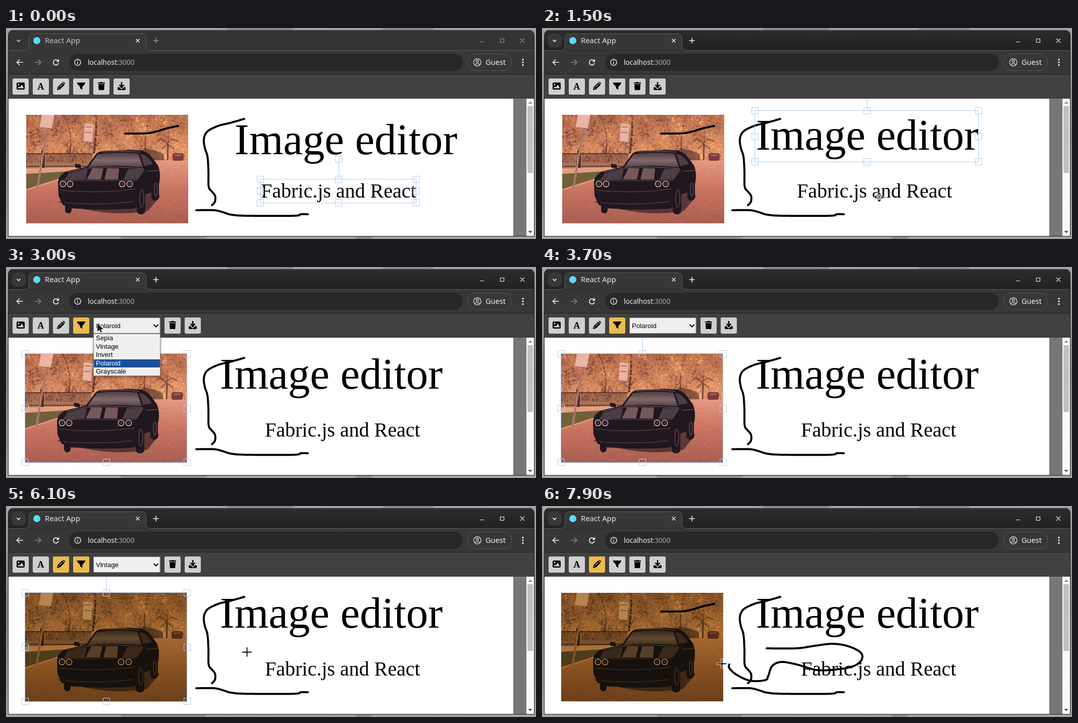
Write an HTML page with a canvas that moves like this. It is 1050 by 418 pixels and loops after 8 s.

```html
<!DOCTYPE html>
<html lang="en">
<head>
<meta charset="utf-8">
<title>Image editor</title>
<style>
html, body { margin: 0; width: 1050px; height: 418px; overflow: hidden; background: #999; }
canvas { display: block; }
</style>
</head>
<body>
<canvas id="stage" width="1050" height="418"></canvas>
<script>
const ctx = document.getElementById('stage').getContext('2d');
const LOOP = 8000, STEP = 100;
const UI = '"Noto Sans", sans-serif', SANS = '"Liberation Sans", sans-serif', SERIF = '"Liberation Serif", serif';

// ---------- helpers ----------
function box(g, x, y, w, h, color, r = 0) {
  g.fillStyle = color;
  g.beginPath();
  g.roundRect(x, y, w, h, r);
  g.fill();
}
function frame(x, y, w, h, color, r = 0, width = 1) {
  ctx.strokeStyle = color;
  ctx.lineWidth = width;
  ctx.beginPath();
  ctx.roundRect(x, y, w, h, r);
  ctx.stroke();
}
function fill(g, color, d) {
  g.fillStyle = color;
  g.fill(new Path2D(d));
}
function line(g, color, width, d) {
  g.strokeStyle = color;
  g.lineWidth = width;
  g.stroke(new Path2D(d));
}
function disc(g, x, y, r, color) {
  g.fillStyle = color;
  g.beginPath();
  g.arc(x, y, r, 0, 7);
  g.fill();
}
function text(s, x, y, font, color = '#000') {
  ctx.font = font;
  ctx.fillStyle = color;
  ctx.fillText(s, x, y);
}
function at(x, y, draw) {
  ctx.save();
  ctx.translate(x, y);
  draw();
  ctx.restore();
}
function gradient(g, y0, y1, ...colors) {
  const fade = g.createLinearGradient(0, y0, 0, y1);
  colors.forEach((c, i) => fade.addColorStop(i / (colors.length - 1), c));
  return fade;
}

// Catmull-Rom samples through a few points
function smooth(points) {
  const out = [points[0]];
  for (let i = 0; i < points.length - 1; i++) {
    const [a, b, c, d] = [-1, 0, 1, 2].map(k => points[Math.max(0, Math.min(points.length - 1, i + k))]);
    const n = Math.ceil(Math.hypot(c[0] - b[0], c[1] - b[1]) / 3);
    for (let j = 1; j <= n; j++) {
      const u = j / n;
      out.push([0, 1].map(k => b[k] + u / 2 * (c[k] - a[k] +
        u * (2 * a[k] - 5 * b[k] + 4 * c[k] - d[k] + u * (3 * (b[k] - c[k]) + d[k] - a[k])))));
    }
  }
  return out;
}
function ink(points) {
  ctx.strokeStyle = '#000';
  ctx.lineWidth = 4;
  ctx.lineCap = ctx.lineJoin = 'round';
  ctx.beginPath();
  points.forEach(p => ctx.lineTo(...p));
  ctx.stroke();
  ctx.lineCap = 'butt';
  ctx.lineJoin = 'miter';
}

const bracket = smooth([[472, 180], [444, 188], [420, 194], [399, 205], [392, 220], [394, 238], [399, 254],
  [401, 282], [401.5, 314], [407, 323], [414, 332], [414, 344], [408, 351]]);
const dash = smooth([[236, 209], [268, 209], [290, 207], [318, 199], [341, 194]]);
const underline = smooth([[377, 361], [412, 361], [430, 365], [447, 370], [480, 372], [570, 372], [584, 369], [598, 369]]);
const scribble = smooth([[445, 282], [503, 282], [540, 277], [574, 273], [604, 277], [630, 289], [634, 303], [620, 316],
  [590, 323], [545, 325], [505, 314], [474, 309], [456, 317], [448, 337], [442, 345], [412, 346], [385, 334], [371, 321], [371, 314]]);

// ---------- photograph ----------
const tones = {
  Polaroid: { sky: '#eda273', back: '#b06a4d', leaves: ['#6f3d34', '#a35d42', '#dc8a58', '#ffb57e'], dark: '#4a2c2b',
    sign: '#e9b3a5', pole: '#a77970', walk: '#e3a07f', grass: '#71603b', far: '#e59a82', road: '#c8715f', near: '#a75e51',
    car: '#20171f', sheen: '#4d3d45', glass: '#80686a', stripe: '#75595c', lamp: '#f3c8ba', red: '#84383c' },
  Vintage: { sky: '#b0733a', back: '#7d4d24', leaves: ['#4a2d17', '#70451f', '#a2652c', '#c68640'], dark: '#2c1b10',
    sign: '#b58450', pole: '#7d5630', walk: '#ad7137', grass: '#4e3c1a', far: '#a66735', road: '#86511f', near: '#6a3f1c',
    car: '#17110d', sheen: '#3a291b', glass: '#604931', stripe: '#573f28', lamp: '#c59560', red: '#59281a' }
};
function paintPhoto(p) {
  const c = document.createElement('canvas');
  c.width = 321;
  c.height = 215;
  const g = c.getContext('2d');
  let seed = 7;
  const rnd = () => (seed = seed * 16807 % 2147483647) / 2147483647;
  // clumped foliage, brighter to the right, over thin trunks
  box(g, 0, 0, 321, 215, gradient(g, 0, 100, p.back, p.sky));
  line(g, p.dark, 4, 'M138 0 Q141 35 134 76');
  line(g, p.leaves[0], 2, 'M85 78 Q96 45 74 0 M238 80 Q232 40 246 0');
  for (let i = 0; i < 4200; i++) {
    const x = rnd() * 321, y = rnd() * 94;
    const clump = Math.sin(x / 19 + y / 13) + Math.sin(x / 8 - y / 11);
    const light = 1.2 + rnd() * 1.6 + clump * .45 + (x - 150) / 320;
    g.globalAlpha = .3 + rnd() * .45;
    disc(g, x, y, .6 + rnd() * 1.8, p.leaves[Math.max(0, Math.min(3, light | 0))]);
  }
  g.globalAlpha = .6;
  fill(g, p.dark, 'M180 78 Q200 62 222 72 Q245 62 272 78 L274 92 H240Z');
  g.globalAlpha = .75;
  line(g, p.dark, 3, 'M281 58 L280 92');
  line(g, p.leaves[0], 2, 'M280 58 Q268 42 258 54 M280 58 Q288 42 301 54 M280 58 L268 68 M280 58 L294 68 M280 58 L282 44');
  g.globalAlpha = 1;
  fill(g, gradient(g, 90, 215, p.far, p.road, p.near), 'M0 108 L235 90 L321 90 L321 215 L0 215Z');
  box(g, 290, 76, 22, 15, p.red, 4);
  box(g, 294, 78, 14, 4, p.glass, 2);
  // fence, walk and verge
  for (let x = 0; x < 132; x += 3) box(g, x, 76, 1.2, 31, p.dark);
  line(g, p.dark, 1.5, 'M0 77 H132 M0 102 H132');
  box(g, 30, 70, 6, 41, p.dark);
  fill(g, p.walk, 'M0 106 L112 103 L95 112 L0 119Z');
  fill(g, p.grass, 'M0 117 L80 112 L66 126 L0 147Z');
  line(g, p.walk, 2, 'M0 149 L64 128');
  for (let i = 0; i < 1200; i++) {
    const y = 95 + rnd() * 120, x = rnd() * 321;
    if (y < 152 - x / 4) continue;
    g.globalAlpha = .25;
    box(g, x, y, 2 + rnd() * 5, 1, rnd() < .5 ? p.near : p.far);
  }
  g.globalAlpha = 1;
  // signs
  line(g, p.pole, 4, 'M43 20 L22 146');
  fill(g, p.sign, 'M31 0 L56 0 L51 27 L27 24Z');
  line(g, p.pole, 2, 'M124 50 V76');
  fill(g, p.sign, 'M116 17 L133 19 L131 54 L114 52Z');
  line(g, p.pole, 2, 'M118 24 H130 M117 35 H130');
  // car
  g.globalAlpha = .6;
  fill(g, p.car, 'M62 172 Q160 206 242 190 L266 160 L240 150Z');
  g.globalAlpha = 1;
  box(g, 77, 168, 13, 27, p.car, 6);
  box(g, 219, 134, 17, 63, p.car, 7);
  box(g, 248, 122, 15, 48, p.car, 7);
  fill(g, p.car, 'M63 134 Q64 119 80 112 L120 103 L139 77 Q143 72 160 71 L222 70 Q240 71 249 84 L261 100 Q267 114 264 134 L258 150 L236 158 L230 180 L212 186 Q150 190 88 185 L72 178 L64 160Z');
  fill(g, p.car, 'M96 97 L107 98 L109 106 L98 105Z M243 93 L256 97 L258 104 L245 105Z');
  fill(g, gradient(g, 75, 106, p.sheen, p.glass, p.sheen), 'M123 104 L142 78 Q182 72 222 77 L231 104 Q175 98 123 104Z');
  fill(g, p.sheen, 'M233 101 L226 78 Q240 78 251 98Z M84 116 L122 107 L118 128 L75 130Z M202 107 L235 108 L222 128 L192 129Z');
  fill(g, p.stripe, 'M131 106 L153 106 L148 128 L120 128Z M160 106 L184 106 L182 128 L155 128Z');
  line(g, p.glass, 1, 'M82 114 L120 106 Q175 101 233 107 M150 74 Q185 70 226 74 M240 112 L262 110');
  line(g, p.sheen, 1.5, 'M67 149 Q140 157 216 147 M75 174 Q145 180 212 172 M66 130 H220');
  box(g, 66, 131, 154, 14, p.car, 6);
  for (const x of [73, 87, 190, 205]) {
    disc(g, x, 137, 6.3, p.lamp);
    disc(g, x, 137, 5, p.car);
    disc(g, x, 137, 2.2, p.sheen);
  }
  g.strokeStyle = p.sheen;
  g.lineWidth = 2;
  for (const [x, y, rx, ry] of [[229, 166, 4, 17], [257, 148, 3, 13]]) {
    g.beginPath();
    g.ellipse(x, y, rx, ry, 0, 0, 7);
    g.stroke();
  }
  return c;
}
const photos = { Polaroid: paintPhoto(tones.Polaroid), Vintage: paintPhoto(tones.Vintage) };

// ---------- browser window ----------
function drawWindow(active) {
  box(ctx, 0, 0, 1050, 418, gradient(ctx, 0, 418, '#a2a3a3', '#858686', '#a2a2a2'));
  fill(ctx, '#8a8b8b', 'M436 0 H572 L566 4 H440Z M750 0 H847 V4 H742Z M225 413 H400 L392 418 H230Z M695 413 H728 L722 418 H690Z');
  box(ctx, 4, 4, 1043, 409, '#1e1e1e', [10, 10, 0, 0]);
  box(ctx, 5, 5, 1041, 42, active ? gradient(ctx, 5, 45, '#2c2c2c', '#212121') : '#343434', [9, 9, 0, 0]);
  line(ctx, '#4d4d4d', 1, 'M13 4.5 H1038');
  const tab = 'M5 44.5 H36 Q45.5 44.5 45.5 35 V21 Q45.5 11.5 55 11.5 H268 Q277.5 11.5 277.5 21 V35 Q277.5 44.5 287 44.5 H1046';
  fill(ctx, '#373737', tab);
  box(ctx, 5, 45, 1041, 47, '#373737');
  line(ctx, '#5c5c5c', 1, tab);
  line(ctx, '#202020', 1, 'M5 91.5 H1046');

  const control = active ? '#f2f2f2' : '#969696';
  if (active) box(ctx, 11, 11, 28, 28, '#383838', 9);
  line(ctx, active ? '#f2f2f2' : '#cfcfcf', 1.7, 'M21.5 23.5 L25 27 L28.5 23.5');
  disc(ctx, 61, 25, 7, '#61dafb');
  text('React App', 77, 30, '14.8px ' + UI, active ? '#e8e8e8' : '#c4c4c4');
  line(ctx, '#e6e6e6', 1.5, 'M257.5 21.5 L264.5 28.5 M264.5 21.5 L257.5 28.5');
  line(ctx, control, 1.6, 'M291.5 25 H302.5 M297 19.5 V30.5');
  line(ctx, control, 1.2, 'M939 27.5 H947 M979.5 21.5 H986.5 V28.5 H979.5Z M1019 21 L1027 29 M1027 21 L1019 29');

  line(ctx, '#f0f0f0', 1.7, 'M33.5 68 H22 M27 62.5 L21.5 68 L27 73.5');
  line(ctx, '#858585', 1.7, 'M57 68 H68.5 M63.5 62.5 L69 68 L63.5 73.5');
  line(ctx, '#f0f0f0', 1.7, 'M103.2 65 A5.2 5.2 0 1 0 104 69.5');
  fill(ctx, '#f0f0f0', 'M105 61.5 V67 H99.5Z');
  box(ctx, 125, 51, 780, 34, '#282828', 17);
  line(ctx, '#e8e8e8', 1.5, 'M136 68 A6 6 0 1 1 148 68 A6 6 0 1 1 136 68 M142 67 V71.5 M142 64.3 V65.8');
  text('localhost', 162, 73, '13.7px ' + UI, '#f2f2f2');
  text(':3000', 219.5, 73, '13.7px ' + UI, '#a9a9a9');
  frame(914.5, 51.5, 87, 33, '#565656', 17);
  line(ctx, '#c8c8c8', 1.5, 'M926.5 68 A7.2 7.2 0 1 1 941 68 A7.2 7.2 0 1 1 926.5 68 M929 72.5 Q934 68.5 938.5 72.5');
  frame(931.5, 63.5, 4.6, 4.6, '#c8c8c8', 3, 1.5);
  text('Guest', 950, 73, '14.5px ' + UI, '#f4f4f4');
  for (const y of [62.5, 68, 73.5]) disc(ctx, 1024, y, 1.7, '#f0f0f0');

  box(ctx, 5, 92, 1041, 48, '#414141');
  box(ctx, 5, 140, 1000, 272, '#fff');
  box(ctx, 1005, 140, 26, 272, '#777');
  box(ctx, 1031, 140, 15, 272, '#f9f9f9');
  box(ctx, 1033, 155, 11, 132, '#c1c1c1');
  fill(ctx, '#8b8b8b', 'M1034.5 150 L1038.5 145.5 L1042.5 150Z');
  fill(ctx, '#4c4c4c', 'M1034.5 402 L1038.5 406.5 L1042.5 402Z');
}

// ---------- toolbar ----------
const icons = {
  image(bg) {
    box(ctx, -8, -7, 16, 14, '#000', 2.5);
    disc(ctx, -4, -3, 1.7, bg);
    fill(ctx, bg, 'M-6 4.5 L-3 .5 L-1.3 2.2 L2.5 -3 L6.3 4.5Z');
  },
  letter() {
    text('A', -7, 7, 'bold 18px "Noto Serif", serif');
  },
  pencil(bg) {
    fill(ctx, '#000', 'M-8 8 L-6.8 2.2 L2.2 -6.8 L6.8 -2.2 L-2.2 6.8Z M3.2 -7.6 Q4.6 -8.8 6 -7.6 L7.6 -6 Q8.8 -4.6 7.6 -3.2Z');
    line(ctx, bg, 1.1, 'M-3 2 L2.6 -3.6 M-5.8 3.4 L-3.5 5.7');
  },
  filter() {
    fill(ctx, '#000', 'M-8 -7 H8 V-5 L2.2 1.8 V7.5 L-2.2 4.5 V1.8 L-8 -5Z');
  },
  trash() {
    fill(ctx, '#000', 'M-7 -7 H-3 L-2 -8 H2 L3 -7 H7 V-5 H-7Z M-6 -4 H6 L5.2 8 H-5.2Z');
  },
  download(bg) {
    box(ctx, -8, 2, 16, 6, '#000', 2);
    line(ctx, bg, 1.5, 'M-5 1 L0 6 L5 1');
    fill(ctx, '#000', 'M-1.3 -8 H1.3 V-1 L3.7 -3.2 L5.2 -1.6 L0 4 L-5.2 -1.6 L-3.7 -3.2 L-1.3 -1Z');
    disc(ctx, 5.5, 5.5, .8, bg);
  }
};
function button(name, x, on) {
  const bg = on ? '#ebba50' : '#cfcfcf';
  box(ctx, x, 100, 32, 32, bg, 3);
  at(x + 16, 115, () => icons[name](bg));
}
function drawToolbar(s) {
  ['image', 'letter', 'pencil', 'filter'].forEach((name, i) =>
    button(name, 13 + i * 40, name === 'pencil' && s.pencil || name === 'filter' && s.filtering));
  const x = s.filtering ? 314 : 173;
  button('trash', x);
  button('download', x + 40);
  if (!s.filtering) return;
  if (s.focused) box(ctx, 172, 99, 134, 34, '#fff', 4);
  box(ctx, 173, 100, 132.5, 32, '#efefef', 2);
  frame(173.5, 100.5, 131.5, 31, s.focused ? '#101010' : '#767676', 2, s.focused ? 2 : 1);
  text(s.value, 178, 121, '13.33px ' + SANS);
  line(ctx, '#000', 2, 'M292.5 114 L297 118.5 L301.5 114');
}
function drawOptions(hover) {
  ctx.save();
  ctx.shadowColor = 'rgba(0,0,0,.4)';
  ctx.shadowBlur = 5;
  ctx.shadowOffsetY = 2;
  box(ctx, 173, 132, 133, 84, '#efefef');
  ctx.restore();
  frame(173.5, 132.5, 132, 83, '#8a8a8a');
  ['Sepia', 'Vintage', 'Invert', 'Polaroid', 'Grayscale'].forEach((name, i) => {
    const y = 133 + i * 16.5;
    if (i === hover) box(ctx, 174, Math.round(y), 131, 16, '#195198');
    text(name, 178, Math.round(y + 12), '13.33px ' + SANS, i === hover ? '#fff' : '#000');
  });
}

// ---------- cursor ----------
const TRACK = [
  [0, 0, 0, ''], [200, 497, 214, 'move'], [300, 634, 241, 'move'], [500, 634, 241, 'move'], [900, 594, 231, 'move'],
  [1100, 605, 232, 'move'], [1200, 605, 232, 'move'], [1500, 668, 335, 'move'], [1600, 668, 330, 'move'],
  [1800, 684, 333, 'move'], [1900, 684, 333, 'move'], [2000, 692, 331, 'move'], [2100, 676, 330, 'move'],
  [2300, 344, 253, 'move'], [2400, 344, 253, 'move'], [2500, 342, 253, 'move'], [2600, 342, 253, 'move'],
  [2800, 146, 113, 'arrow'], [3000, 181, 112, 'arrow'], [3200, 181, 112, 'arrow'], [3400, 213, 157, 'arrow'],
  [3700, 0, 0, ''], [4600, 213, 157, 'arrow'], [4700, 213, 157, 'arrow'], [5000, 108, 112, 'arrow']
];
const DRAW_TRACK = [
  [5200, 108, 112, 'cross'], [5600, 472, 284, 'cross'], [5700, 490, 246, 'cross'], [5800, 488, 291, 'cross'],
  [5900, 480, 290, 'cross'], [6000, 480, 290, 'cross'], [6100, 477, 289, 'cross'], [6200, 445, 282, 'cross'],
  [7600, 371, 315, 'cross'], [7700, 371, 315, 'cross'], [7800, 364, 319, 'cross'], [7900, 356, 312, 'cross']
];
const KEYS = [...TRACK, ...DRAW_TRACK];
function cursorAt(t) {
  const i = KEYS.findLastIndex(k => k[0] <= t);
  const [t0, x0, y0, shape] = KEYS[i], next = KEYS[i + 1];
  if (!next || !shape || !next[3]) return { x: x0, y: y0, shape };
  const u = (t - t0) / (next[0] - t0);
  const x = x0 + (next[1] - x0) * u, y = y0 + (next[2] - y0) * u;
  return { x: Math.round(x), y: Math.round(y), shape: y < 140 ? 'arrow' : shape };
}
function outlined(d, rim) {
  line(ctx, '#fff', rim, d);
  fill(ctx, '#1c1c1c', d);
}
const cursors = {
  arrow() {
    outlined('M0 0 V16 L4 12.5 L6.8 18 L9.2 17 L6.8 11.5 H12Z', 2);
  },
  cross() {
    line(ctx, '#fff', 4, 'M-10 .5 H10 M.5 -10 V10');
    line(ctx, '#000', 1.8, 'M-9 .5 H9.5 M.5 -9 V9.5');
  },
  move() {
    for (let i = 0; i < 4; i++) {
      outlined('M0 -9.5 L4 -5.5 H-4Z', 1.4);
      ctx.rotate(Math.PI / 2);
    }
    box(ctx, -4.5, -4.5, 9, 9, '#fff', 1);
    frame(-3.5, -3.5, 7, 7, '#222');
    line(ctx, '#222', 1.5, 'M-2 0 H2 M0 -2 V2');
  }
};

// ---------- editor ----------
function selection(l, t, w, h, faded) {
  const r = l + w, b = t + h, cx = Math.round(l + w / 2), cy = Math.round(t + h / 2);
  ctx.save();
  ctx.globalAlpha = faded ? .4 : 1;
  frame(l - .5, t - .5, w, h + 1, '#b2ccf4');
  line(ctx, '#b2ccf4', 1, `M${cx + .5} ${t} V${t - 40}`);
  for (const [x, y] of [[l, t], [cx, t], [r, t], [l, cy], [r, cy], [l, b], [cx, b], [r, b], [cx, t - 40]])
    frame(x - 6.5, y - 6.5, 13, 13, '#b2ccf4');
  ctx.restore();
}
function dragged(t, cursor, start, end, from, rest) {
  if (t < start) return [0, 0];
  return t >= end ? rest : [cursor.x - from[0], cursor.y - from[1]];
}

function render(t) {
  const cursor = cursorAt(t);
  const selected = t < 500 ? 'sub' : t < 1600 ? 'title' : t < 2400 ? 'sub' : t < 6200 ? 'photo' : '';
  const moving = t >= 600 && t < 1100 || t >= 1700 && t < 2100 || t === 2500;
  const state = {
    pencil: t >= 5100,
    filtering: t >= 2800 && t < 6200,
    focused: t >= 4000 && t < 5100,
    value: t < 4000 ? 'Polaroid' : 'Vintage'
  };
  const [tx, ty] = dragged(t, cursor, 500, 1100, [634, 241], [-29, -9]);
  const [sx, sy] = dragged(t, cursor, 1600, 2100, [668, 330], [8, 0]);
  const px = t < 2500 ? 40 : 38;
  const objects = {
    photo: [() => ctx.drawImage(photos[state.value], px, 172), px, 172, 321, 215],
    title: [() => text('Image editor', 452.7 + tx, 250 + ty, '86.9px ' + SERIF), 451 + tx, 173 + ty, 443, 101],
    sub: [() => text('Fabric.js and React', 505 + sx, 336 + sy, '40px ' + SERIF), 504 + sx, 300 + sy, 309, 46]
  };

  drawWindow(t >= 500);
  drawToolbar(state);

  ctx.save();
  ctx.beginPath();
  ctx.rect(5, 140, 1000, 272);
  ctx.clip();
  if (selected !== 'photo') objects.photo[0]();
  [bracket, dash, underline].forEach(ink);
  objects.title[0]();
  objects.sub[0]();
  if (t >= 6200) {
    const progress = Math.min(1, (t - 6200) / 1300);
    const drawn = scribble.slice(0, 1 + Math.round(progress * (scribble.length - 1)));
    ink(drawn);
    if (t < 7600) [cursor.x, cursor.y] = drawn.at(-1).map(Math.round);
  }
  if (selected) {
    const [draw, ...bounds] = objects[selected];
    if (selected === 'photo') draw();
    selection(...bounds, moving);
  }
  ctx.restore();

  if (t >= 3000 && t < 3700) drawOptions(t < 3300 ? 3 : t < 3400 ? 0 : 1);
  if (cursor.shape) at(cursor.x, cursor.y, cursors[cursor.shape]);
}

const begin = performance.now();
function tick() {
  const t = (performance.now() - begin) % LOOP;
  render(Math.floor(t / STEP) * STEP);
  requestAnimationFrame(tick);
}
tick();
</script>
</body>
</html>
```
